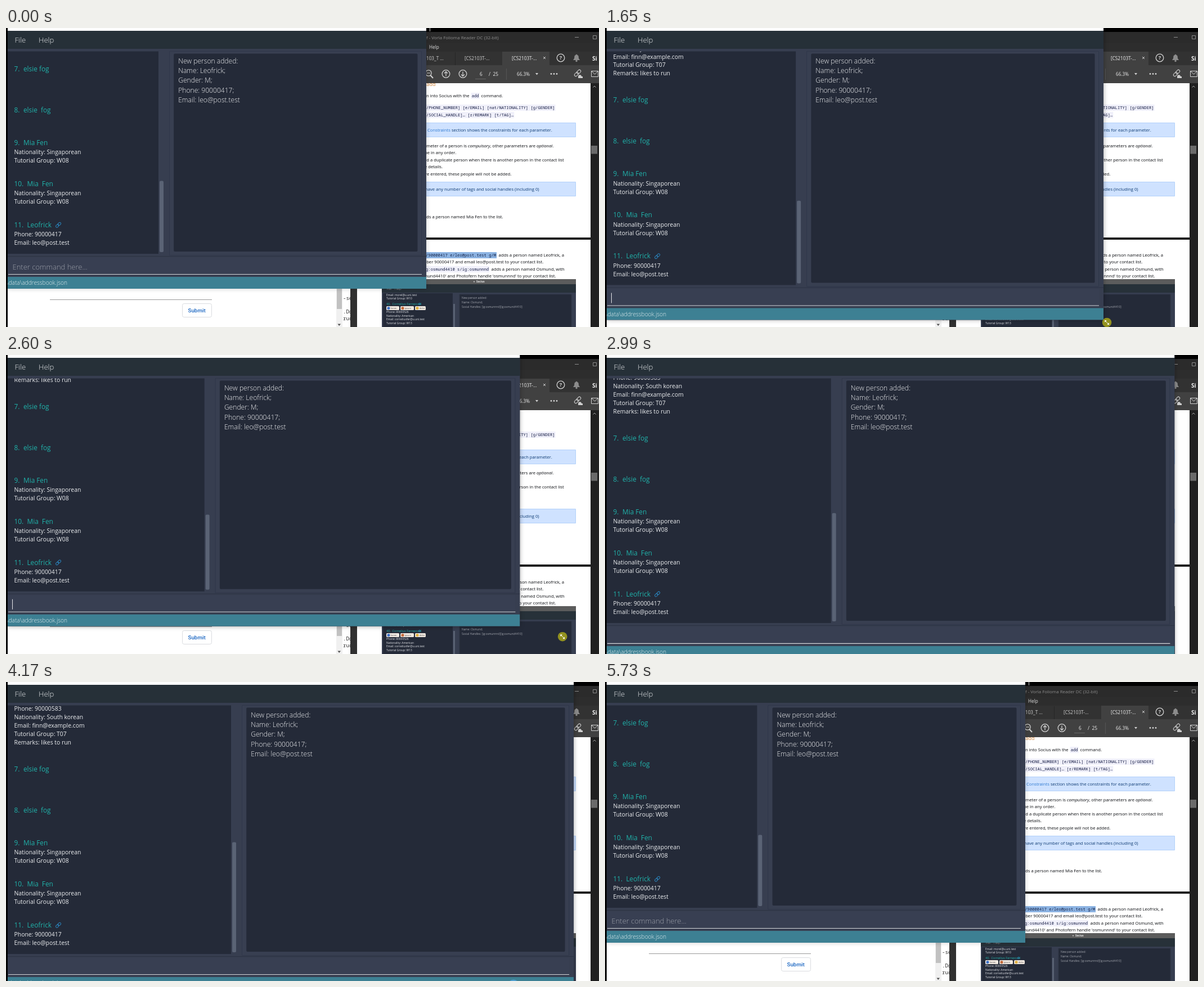
Recreate the animation shown at these times as an HTML page with a canvas. Size 1054 by 531 pixels, loop 5800 ms.

```html
<!DOCTYPE html>
<html lang="en">
<head>
<meta charset="utf-8">
<title>Resizing a window</title>
<style>
  html, body { margin: 0; width: 100%; height: 100%; overflow: hidden; background: #000; }
  canvas { display: block; }
</style>
</head>
<body>
<canvas id="stage" width="1054" height="531"></canvas>
<script>
const ctx = document.getElementById('stage').getContext('2d');
const LOOP = 5800, FOCUS = 1200, BLUR = 5730;
const MIN_RIGHT = 747;
const SANS = '"Open Sans", "Noto Sans", sans-serif';
const MONO = '"Noto Sans Mono", "DejaVu Sans Mono", monospace';

// time, window right, window bottom, pointer x, pointer y
const DRAG = [
  [1230, 747, 463, 748, 465],
  [1650, 886, 518.5, 892, 523],
  [1770, 890, 516, 896, 521],
  [2150, 747, 463, 620, 400],
  [2400, 760, 463, 860, 460],
  [2600, 913, 481.5, 989, 500],
  [2850, 1018, 545, 1026, 552],
  [3050, 1010, 535, 1000, 540],
  [3380, 747, 463, 530, 368],
  [3470, 747, 463, 454, 336],
  [3700, 747, 463, 560, 380],
  [3950, 900, 500, 930, 520],
  [4170, 1009, 545, 1018, 550],
  [4350, 1018, 548, 1022, 553],
  [4800, 747, 463, 650, 385],
  [4870, 747, 463, 635, 373]
];

function dragAt(t) {
  const next = DRAG.findIndex(k => k[0] > t);
  if (next === 0) return DRAG[0].slice(1);
  if (next < 0) return DRAG[DRAG.length - 1].slice(1);
  const a = DRAG[next - 1], b = DRAG[next];
  const p = (t - a[0]) / (b[0] - a[0]);
  return a.slice(1).map((v, i) => v + (b[i + 1] - v) * p);
}

function box(x, y, right, bottom, fill, stroke) {
  ctx.fillStyle = fill;
  ctx.fillRect(x, y, right - x, bottom - y);
  if (stroke) line([[x, y], [right, y], [right, bottom], [x, bottom], [x, y]], stroke);
}

function round(x, y, right, bottom, radius, fill, stroke) {
  ctx.beginPath();
  ctx.roundRect(x, y, right - x, bottom - y, radius);
  ctx.fillStyle = fill;
  ctx.fill();
  if (stroke) { ctx.strokeStyle = stroke; ctx.lineWidth = 1; ctx.stroke(); }
}

function line(points, color, width = 1) {
  ctx.beginPath();
  points.forEach(p => ctx.lineTo(...p));
  ctx.strokeStyle = color;
  ctx.lineWidth = width;
  ctx.stroke();
}

function shape(points, fill, stroke) {
  ctx.beginPath();
  points.forEach(p => ctx.lineTo(...p));
  ctx.closePath();
  if (stroke) { ctx.strokeStyle = stroke; ctx.lineWidth = 1.6; ctx.stroke(); }
  ctx.fillStyle = fill;
  ctx.fill();
}

function circle(x, y, r, fill, stroke, width = 1.3) {
  ctx.beginPath();
  ctx.arc(x, y, r, 0, 7);
  if (fill) { ctx.fillStyle = fill; ctx.fill(); }
  if (stroke) { ctx.strokeStyle = stroke; ctx.lineWidth = width; ctx.stroke(); }
}

// y is the middle of the capitals; returns the x where the text ends
function text(str, x, y, size, color, { weight = 400, family = SANS, style = '' } = {}) {
  ctx.font = `${style} ${weight} ${size}px ${family}`;
  ctx.fillStyle = color;
  ctx.fillText(str, x, y + size * 0.36);
  return x + ctx.measureText(str).width;
}

const light = (str, x, y, size, color) => text(str, x, y, size, color, { weight: 300 });

const doc = (str, x, y, style) => text(str, x, y, 7.7, '#0a0c10', { style });

function code(str, x, y, fill = '#f0f0fa', color = '#161d45') {
  ctx.font = `7.2px ${MONO}`;
  box(x - 1, y - 5.5, x + ctx.measureText(str).width + 1, y + 5.5, fill);
  return text(str, x, y, 7.2, color, { family: MONO });
}

function drawForm() {
  box(3, 440, 598, 531, '#fff');
  line([[78, 482.5], [366, 482.5]], '#999');
  round(313.5, 489.5, 365.5, 513.5, 3, '#fff', '#dadce0');
  text('Submit', 323.5, 501, 9.8, '#1a66c2', { weight: 500, family: 'Roboto, sans-serif' });
  box(587, 440, 598, 531, '#f0f0f0');
  box(588, 440, 597, 499, '#c1c1c1');
  shape([[589.5, 525.5], [595, 525.5], [592.2, 529]], '#505050');
  box(598, 440, 612, 531, '#fff');
  ['-se', '.Do', 'ruc'].forEach((s, i) =>
    text(s, 599, [480, 504, 516][i], 9, '#333', { family: MONO }));
  box(612, 440, 624, 531, '#303030');
}

function drawToolbar() {
  const gray = '#d0d0d0', dim = '#8c8c8c';
  box(740, 7, 1054, 27, '#2b2b2b');
  box(740, 27, 1054, 42, '#2d2d2d');
  box(740, 42, 1054, 66, '#323232');
  box(882, 42, 966, 66, '#414141');
  box(740, 66, 1054, 98, '#414141');
  line([[798.5, 43], [798.5, 66]], '#262626');
  line([[753.5, 0], [753.5, 6]], '#ccc');
  text('f - Vorla Folioma Reader DC (32-bit)', 747, 17, 7.9, dim);
  line([[1011, 16.5], [1018, 16.5]], dim);
  box(1043.5, 13.5, 1049.5, 19.5, '#2b2b2b', dim);
  text('Help', 752, 34, 8.2, '#ddd');
  text('103_T ...', 747, 54, 8.2, gray);
  text('[CS2103T-...', 815, 54, 8.2, gray);
  text('[CS2103T-...', 899, 54, 8.2, '#f0f0f0');
  line([[955, 51], [959, 55]], gray);
  line([[959, 51], [955, 55]], gray);
  circle(986, 53, 6.8, null, gray);
  text('?', 983.7, 53, 9.5, gray, { weight: 700 });
  shape([[1008, 57], [1010, 54], [1010.5, 49.5], [1014, 46.5], [1017.5, 49.5], [1018, 54], [1020, 57]], dim);
  circle(1014, 58.5, 1.7, dim);
  text('Si', 1042, 54, 10, '#eee', { weight: 700 });

  circle(751, 80, 5.2, null, gray);
  line([[754.5, 84], [759, 89]], gray, 2);
  line([[748, 80], [754, 80]], gray);
  [[782, -1], [812, 1]].forEach(([x, dir]) => {
    circle(x, 81.5, 6.8, null, gray);
    line([[x, 81.5 - dir * 4], [x, 81.5 + dir * 4]], gray, 1.3);
    line([[x - 3, 81.5 + dir], [x, 81.5 + dir * 4], [x + 3, 81.5 + dir]], gray, 1.3);
  });
  box(834, 90, 853, 91, '#666');
  text('6', 842, 82, 8.4, '#eee');
  text('/  25', 858, 82, 8.4, '#eee');
  line([[889.5, 72], [889.5, 92]], '#555');
  text('66.3%', 908, 82, 8.2, '#eee');
  shape([[941, 80], [946, 80], [943.5, 83.5]], gray);
  [969, 974, 979].forEach(x => circle(x, 81.5, 1.4, gray));
  ctx.save();
  ctx.translate(1016, 80);
  ctx.rotate(-0.8);
  round(-7, -2.5, 1, 2.5, 2.5, 'transparent', gray);
  round(-1, -2.5, 7, 2.5, 2.5, 'transparent', gray);
  ctx.restore();
  circle(1020, 86, 2.8, gray);
  box(1017, 86, 1025, 89, gray);
  box(1040.5, 76.5, 1052.5, 86.5, '#414141', gray);
  line([[1040.5, 76.5], [1046.5, 82], [1052.5, 76.5]], gray);
}

function drawPages() {
  box(624, 98, 1054, 531, '#202020');
  box(624, 98, 1039, 372, '#fff');
  box(624, 376, 1039, 531, '#fff');
  box(1040, 209, 1051, 223.5, '#6a6a6a');
  line([[1043.5, 105.5], [1046, 103], [1048.5, 105.5]], '#aaa');
  text('add', 747, 100, 9.2, '#d28a45', { family: MONO });

  let x = doc('n into Socius with the ', 747, 120.5);
  x = code('add', x + 2, 120.5);
  doc(' command.', x + 2, 120.5);
  code('/PHONE_NUMBER] [e/EMAIL] [nat/NATIONALITY] [g/GENDER]', 747, 141.5);
  code('/SOCIAL_HANDLE]… [r/REMARK] [t/TAG]…', 747, 154.5);

  const navy = '#0d3a70';
  [168, 273].forEach(y => box(740.5, y + 0.5, 1012.5, y + 25.5, '#cfe2ff', '#b3d1fa'));
  x = text('Constraints', 749, 181, 7.7, '#2e79d0');
  text(' section shows the constraints for each parameter.', x, 181, 7.7, navy);
  text('have any number of tags and social handles (including 0)', 745, 286, 7.7, navy);

  x = doc('meter of a person is ', 747, 209);
  x = doc('compulsory', x, 209, 'italic');
  x = doc(', other parameters are ', x, 209);
  x = doc('optional', x, 209, 'italic');
  doc('.', x, 209);
  doc('be in any order.', 744, 221.5);
  doc('ed a duplicate person when there is another person in the contact list', 743, 234);
  doc('e details.', 744, 246.5);
  doc('re entered, these people will not be added.', 745, 259);
  doc('ds a person named Mia Fen to the list.', 747, 335);

  code('/90000417 e/leo@post.test g/M', 746, 403.5, '#8cb3e2', '#16244a');
  doc('adds a person named Leofrick, a', 875.5, 403.5);
  doc('mber 90000417 and email leo@post.test to your contact list.', 740, 415.5);
  code('g:osmund4410 s/ig:osmunnnd', 746, 428.5);
  doc('adds a person named Osmund, with', 862.5, 428.5);
  doc("mund4410' and Photofern handle 'osmunnnd' to your contact list.", 742, 440.5);
}

function drawThumbnail() {
  const small = (s, x, y) => text(s, x, y, 4.9, '#e4e6ea');
  box(668, 446, 1013, 531, '#373e50');
  box(668, 446, 1013, 455, '#5c5c5c');
  circle(832, 450.5, 1.1, '#ccc');
  text('Socius', 836, 450.5, 4.6, '#eee', { weight: 700 });
  box(668, 455, 1013, 470, '#273139');
  light('File    Help', 677, 463, 5.5, '#ccc');
  box(670, 471, 794, 531, '#242a38');
  box(795, 490, 798, 531, '#596273');
  box(806, 473, 1005, 531, '#242a38', '#2e3544');
  small('Email: morel@u.uni.test', 676, 474);
  small('Tutorial Group: W10', 676, 480.5);
  text('40.  Cornelius Fernwood', 676, 490.5, 5.5, '#20b2aa');
  circle(735, 490, 1.5, null, '#2a8fc0', 0.8);
  [[676, 'lorem', '#3b70c8'], [701, 'ipsum', '#c46a3a'], [727, 'dolor', '#e0b040']].forEach(([x, label, color], i) => {
    round(x, 494, x + [23, 24, 19][i], 501, 1.5, '#f0e8e0');
    circle(x + 4, 497.5, 2.6, color);
    text(label, x + 8, 497.5, 3.8, '#444');
  });
  ['Phone: 80000526', 'Nationality: American', 'Email: corneliusfer@u.uni.test', 'Tutorial Group: W13']
    .forEach((s, i) => small(s, 676, 504.5 + i * 6.5));
  ['New person added:', 'Name: Osmund;', 'Social Handles: [ig:osmunnnd][ig:osmund4410]']
    .forEach((s, i) => light(s, 810, 479.5 + i * 7.6, 5.1, '#e4e6ea'));
}

const GROUP = ['Nationality: Singaporean', 'Tutorial Group: W08'];
const PEOPLE = [
  [-401, '6.', 'Finn Dale', ['Phone: 90000583', 'Nationality: South korean', 'Email: finn@example.com', 'Tutorial Group: T07', 'Remarks: likes to run']],
  [-277, '7.', 'elsie fog', []],
  [-204, '8.', 'elsie  fog', []],
  [-146, '9.', 'Mia Fen', GROUP],
  [-73, '10.', 'Mia  Fen', GROUP],
  [0, '11.', 'Leofrick', ['Phone: 90000417', 'Email: leo@post.test']]
];

function drawList(right, bottom) {
  const end = bottom - 62;
  box(3, 41.5, right, end, '#242a38');
  ctx.save();
  ctx.beginPath();
  ctx.rect(3, 41.5, right - 3, end - 41.5);
  ctx.clip();
  const last = bottom - 113.3;
  for (const [offset, number, name, details] of PEOPLE) {
    const y = last + offset;
    text(number, 14.5, y, 11.8, '#20b2aa');
    text(name, number.length > 2 ? 37.5 : 31, y, 11.8, '#20b2aa');
    details.forEach((s, i) => text(s, 14.5, y + 16.8 + i * 14.9, 10.4, '#eceef0'));
  }
  ctx.translate(93, last);
  ctx.rotate(-0.75);
  round(-5.5, -2, 0.5, 2, 2, 'transparent', '#2a86c0');
  round(-0.5, -2, 5.5, 2, 2, 'transparent', '#2a86c0');
  ctx.restore();

  const visible = bottom - 103 > 430 ? 5 : 4;
  const thumb = (bottom - 115) * visible / 11;
  round(right + 2, bottom - 65 - thumb, right + 9, bottom - 65, 2, '#5a6375');
}

function drawWindow(t, right, bottom) {
  const focused = t >= FOCUS && t < BLUR;
  ctx.save();
  ctx.shadowColor = `rgba(0,0,0,${focused ? 0.35 : 0.2})`;
  ctx.shadowBlur = 8;
  box(3, 0, right, bottom, '#373e50');
  ctx.restore();
  box(0, 0, 3, 531, '#000');
  ctx.save();
  ctx.beginPath();
  ctx.rect(3, 0, right - 3, bottom);
  ctx.clip();

  box(3, 0, right, 5, '#fff');
  box(3, 5, right, 37, '#263038');
  light('File', 15.5, 21, 13.1, '#e8eaec');
  light('Help', 58, 21, 13.1, '#e8eaec');

  const listRight = (t < FOCUS ? 271 : 270.3) + 0.495 * (right - MIN_RIGHT);
  drawList(listRight, bottom);

  box(listRight + 19.5, 41.5, right - 8.5, bottom - 59.5, '#383f51', '#30374a');
  const resultLeft = listRight + 27.2;
  round(resultLeft, 45.5, right - 15.5, bottom - 66, 2, '#242a38');
  ['New person added:', 'Name: Leofrick;', 'Gender: M;', 'Phone: 90000417;', 'Email: leo@post.test']
    .forEach((s, i) => light(s, resultLeft + 8, 58.3 + i * 17.3, 12.1, '#f0f1f3'));

  line([[3, bottom - 57.5], [right, bottom - 57.5]], '#2b3242');
  box(3, bottom - 55, right - 8, bottom - 26, '#383f52');
  line([[4, bottom - 25.5], [right - 8, bottom - 25.5]], '#d4d6da', 1.2);
  if (!focused) light('Enter command here...', 11.5, bottom - 39, 13, '#9a9ea8');
  else if ((t - FOCUS) % 1000 < 500) line([[11.5, bottom - 48], [11.5, bottom - 30]], '#e8e8ea');

  box(3, bottom - 21, right, bottom, '#3d8093');
  light('\\data\\addressbook.json', 1, bottom - 10.5, 10.2, '#e8f0f2');
  ctx.restore();
}

function drawResizeCursor(x, y, outline) {
  ctx.save();
  ctx.translate(x, y);
  ctx.rotate(Math.PI / 4);
  if (outline) line([[-4, 0], [4, 0]], outline, 2.4);
  [-1, 1].forEach(d => shape([[d * 5.6, 0], [d * 2.8, -2.4], [d * 2.8, 2.4]], '#fff', outline));
  line([[-4, 0], [4, 0]], '#fff', 0.9);
  ctx.restore();
}

function drawPointer(t, x, y) {
  if (t >= 70 && t < 690) {
    const p = Math.min(1, (t - 70) / 550), ease = p * (2 - p);
    ctx.save();
    ctx.translate(890 - 148 * ease, 508 - 60 * ease);
    shape([[0, 0], [0, 13], [3, 10.4], [5, 15], [7, 14], [5, 9.6], [9, 9.4]], '#fff', '#111');
    ctx.restore();
  } else if (t >= 690 && t < 1230) {
    drawResizeCursor(747, 460 + 5 * Math.min(1, (t - 690) / 270), '#111');
  } else if (t >= 1230 && t < 5070) {
    circle(x, y, t < 5000 ? 8.3 : 5, '#93921f');
    drawResizeCursor(x, y);
  }
  if (t > 4130 && t < 4230) circle(902, 539, 10.5, '#4f9fd0');
}

function frame(now) {
  const t = now % LOOP;
  const [right, bottom, x, y] = dragAt(t);
  box(0, 0, 1054, 531, '#000');
  drawForm();
  drawPages();
  drawThumbnail();
  drawToolbar();
  drawWindow(t, right, bottom);
  drawPointer(t, x, y);
  requestAnimationFrame(frame);
}
requestAnimationFrame(frame);
</script>
</body>
</html>
```
